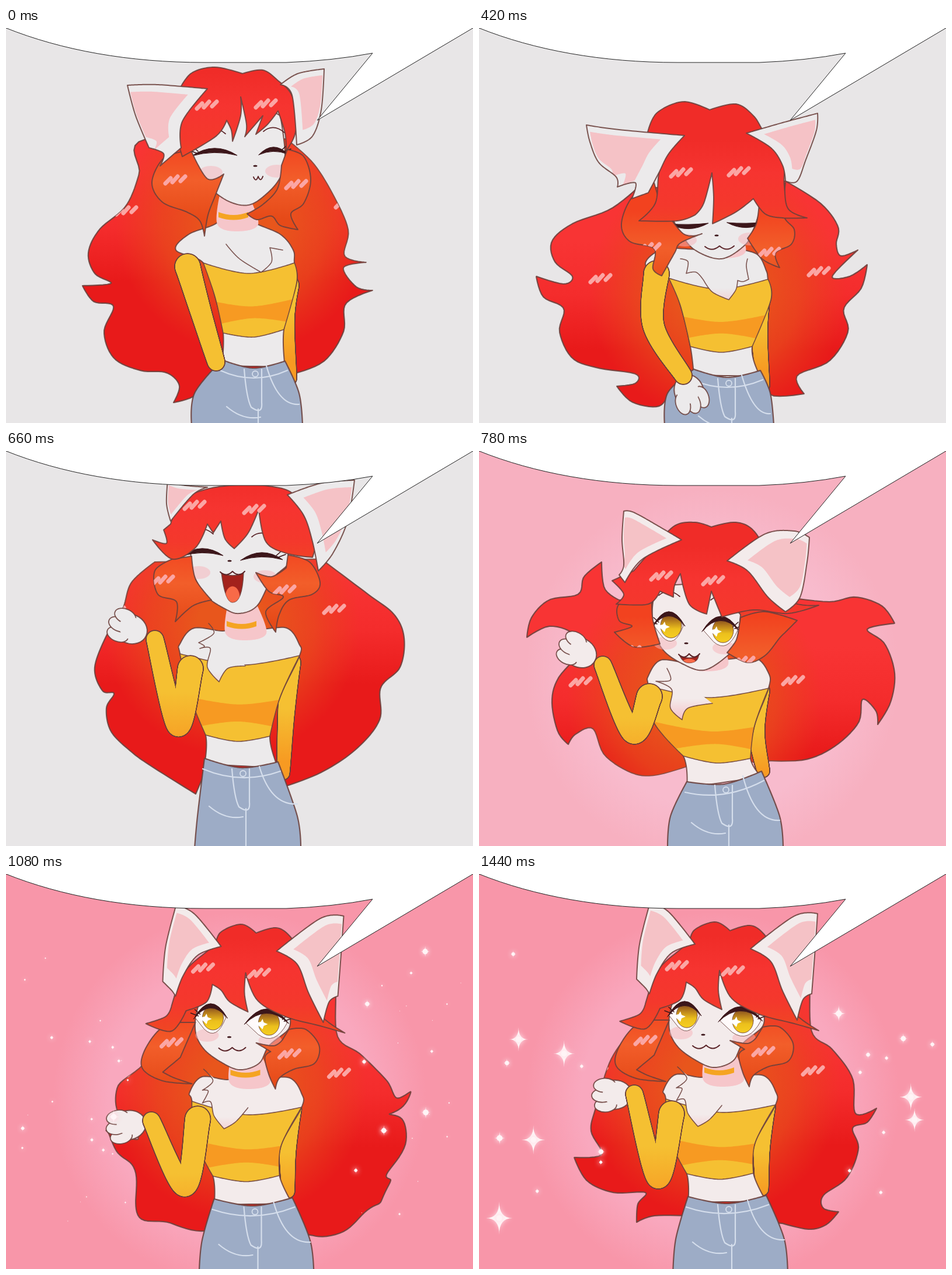
Animation, 800 px wide and 676 px high, one loop 1.5 s. Source, as an HTML page with a canvas:

```html
<!DOCTYPE html>
<html lang="en">
<head>
<meta charset="utf-8">
<title>Dancing cat girl</title>
<style>
html, body { margin: 0; height: 100%; overflow: hidden }
canvas { display: block; width: 100vw; height: 100vh }
</style>
</head>
<body>
<canvas id="stage" width="800" height="676"></canvas>
<script>
const ctx = document.getElementById('stage').getContext('2d');
const LOOP = 1500, STEP = 60, SAMPLES = 240, TAU = Math.PI * 2;
const INK = '#6b403ce0', DARK = '#3c161a', YELLOW = '#f5c032', ORANGE = '#f79a22';
const GREY = { edge: [232, 230, 231], glow: [232, 230, 231], skin: [236, 234, 235] };

// Key poses. Splines run through "x,y" points; "!" marks a sharp corner, "/" a second line.
// body: neck, then left and right shoulder, neckline, bust, hem, waist, hip.
// eyes: x, y, half width.  mouth: x, y, half width, openness.  hand: x, y, size.
const shy = {
  ...GREY, at: 0, shift: [0, 0], open: 0, arch: 1, sparkle: 0,
  body: '390,306 291,380 492,380 338,402 494,402 358,460 498,435 372,522 476,516 370,568 478,570 318,680 508,680',
  eyes: [[357, 217, 36], [458, 215, 22]], mouth: [432, 257, 8, 0], hand: [350, 560, 0],
  armL: '311,408 332,480 360,572', armR: '484,440 480,500 487,600',
  hair: '240,190 228,250 205,305 160,345 141,385 152,420 180,437 131,441! 150,468 184,476 168,520 185,565 230,586 275,590 297,612 287,641! 325,628 350,590! 492,592! 545,570 578,520 582,472 628,449! 600,443 578,410 617,401! 580,390 586,345 560,285 525,230 480,190!',
  tuft: '377,370! 400,395 437,418! 455,400 452,376! 474,380!',
  face: '300,215 318,240 345,270 380,296 415,303 445,285 470,255 478,215 470,150! 400,110! 330,150!',
  lock: '300,212! 268,225 250,265 268,298 310,315 332,330 340,356! 346,320 358,288 373,250! 345,258 318,212!/482,208! 510,220 522,260 510,300 488,318 500,345! 470,338 455,322 430,328 413,318! 440,302 465,275 472,235!',
  bangs: '297,105! 318,77 358,67 405,78! 440,72 466,90 488,112 499,150 494,185 480,210! 478,180 466,142! 448,165 428,182! 440,150! 409,186! 412,165 402,118! 402,150 388,194! 386,175 378,158! 360,185 302,220! 290,165',
  ear: '208,98! 260,97 345,104! 302,160 300,205! 264,236! 270,215 245,205! 222,150/545,70! 500,78 470,97! 490,115 498,200! 525,185 540,140'
};
const bow = {
  ...shy, at: 420, arch: -.6,
  body: '415,352 285,405 492,415 325,428 495,430 345,475 500,465 362,545 468,545 368,584 482,586 318,680 505,680',
  eyes: [[359, 333, 31], [458, 331, 30]], mouth: [412, 376, 25, 0], hand: [362, 628, 1],
  armL: '304,420 299,510 350,595', armR: '482,450 480,520 487,612',
  hair: '270,275! 225,310 160,335 125,365 130,400 160,425 145,438 98,425! 110,460 145,480 138,520 160,565 205,582 268,592 268,608 236,613! 262,640 305,648 325,630 350,600! 495,590! 500,628 557,626! 545,595 600,570 632,520 625,480 655,445 665,405! 635,425 605,425 649,380! 620,390 612,370 615,340 585,300 525,262!',
  tuft: '345,395! 358,400 355,420! 372,418 385,432! 400,452 428,465! 440,448 443,432! 452,434 462,430! 458,408 460,395!',
  face: '330,320 345,350 370,380 415,395 455,372 470,345 482,310! 478,285 400,240! 330,290!',
  lock: '300,265! 262,290 244,335 258,365 300,378 298,412 313,424! 335,385 345,368 382,352! 350,352 310,300!/525,265! 522,320 540,345 535,370 508,385 515,410! 485,395 460,360! 475,335 480,300!',
  bangs: '289,178! 305,145 350,126 395,140! 440,130 470,150 488,178 520,225 523,270 530,310 562,325! 520,325 490,318 470,292! 440,315 400,335! 402,290 399,248! 385,300 370,320! 340,330 274,330! 302,300 308,250 320,210 310,190!',
  ear: '184,166! 240,174 352,184! 325,215 308,248 290,282! 262,292! 268,265 237,272! 235,255 205,230 190,195/580,146! 520,162 458,180! 500,205 520,235 525,262! 545,262 560,225 578,175'
};
const laugh = {
  ...shy, at: 660,
  body: '404,282 298,330 502,330 298,347 503,350 315,420 470,420 342,486 452,488 340,526 466,532 323,680 505,680',
  eyes: [[336, 178, 33], [438, 185, 33]], mouth: [388, 209, 21, 1], hand: [207, 302, 1],
  armL: '316,372 294,470 255,322', armR: '487,362 480,450 475,552',
  hair: '255,190! 215,225 200,270 175,310 152,370 165,410 185,415 172,440 180,480 215,515 250,540 325,587! 345,540! 475,575! 540,550 600,510 640,460 642,405 675,370 682,320 665,280 620,245 540,185!',
  tuft: '347,295! 356,312 330,328! 340,334 332,338! 350,338 345,370 365,395! 380,372 410,368!',
  face: '320,160 318,200 340,245 375,270 400,278 430,265 455,220 485,190 475,160! 430,100! 340,125!',
  lock: '285,185! 255,205 260,245 292,258 290,292! 320,265 352,255! 325,220 318,180!/483,178! 520,190 538,225 525,245 485,255 468,280 462,310! 445,275 475,250 450,240 428,208! 455,215 480,200!',
  bangs: '282,125! 300,85 345,65 400,58 450,60 490,72 510,110 530,150 525,182! 480,175 445,155 433,100! 415,140 391,167! 375,150 368,120! 355,140! 345,125! 325,165 285,185 251,152! 275,158 270,135!',
  ear: '277,50! 300,58 345,62! 320,75 282,120! 275,90/597,50! 540,55 482,75! 510,110 525,155 535,205! 560,175 585,120'
};
const wink = {
  ...shy, at: 780, open: 1, edge: [247, 176, 192], glow: [248, 187, 205], skin: [243, 235, 235],
  body: '385,335 290,385 496,380 290,402 496,406 300,465 472,470 350,522 465,526 356,566 484,548 323,680 521,680',
  eyes: [[325, 299, 25], [414, 307, 29]], mouth: [360, 350, 18, .25], hand: [167, 342, 1],
  armL: '292,420 263,482 212,366', armR: '480,410 475,480 487,548',
  hair: '240,255! 215,235 210,190! 180,215 170,245 120,255 90,285 82,319! 120,300 160,312 170,345 135,390 125,430 135,480 153,502! 165,485 195,475 215,520 260,550 300,555 355,540! 500,530! 560,528 610,505 650,465 657,425 680,445 683,468! 705,430 712,380 695,330 665,305 712,295! 690,265 645,250 600,258 525,250!',
  tuft: '322,372! 328,392 303,394! 330,408 328,440 348,460! 358,440 400,432!',
  face: '300,250 298,300 315,340 350,365 385,375 420,355 440,330 448,280! 400,225! 320,230!',
  lock: '280,245! 240,262 240,290 262,300 232,310! 265,335 310,330! 298,290 296,255!/448,285! 490,275 545,290! 525,310 515,320 490,350 460,362 425,345! 440,325 445,305!',
  bangs: '265,205! 300,165 335,128 370,122 398,130! 440,122 472,138 500,190 530,255 582,264! 530,278 470,272 416,284! 398,240! 390,279! 360,262 345,210! 335,230 333,250! 310,240! 290,262 235,262! 248,245 228,222!',
  ear: '248,103! 265,105 310,130 347,152! 280,185 250,225! 240,212! 248,195 245,150/566,148! 540,137 490,142 425,188! 460,205 495,250 525,275! 550,250 562,190'
};
const smile = {
  ...wink, at: 1200, edge: [248, 150, 169], glow: [249, 168, 190], sparkle: .8,
  body: '412,322 316,370 508,372 320,385 508,395 325,450 473,460 356,513 470,512 358,552 492,550 332,690 529,690',
  eyes: [[352, 242, 26], [448, 251, 35]], mouth: [389, 296, 23, 0], hand: [226, 378, 1],
  armL: '330,410 306,520 266,376', armR: '490,398 484,470 485,540',
  hair: '300,225! 260,270 235,335 200,420 188,470 205,520 186,530! 210,548 255,545 290,552 275,585 268,618! 300,605 360,610! 520,620! 560,632 600,622 625,600! 600,592 600,570 640,525 645,480 635,450 660,440 680,411! 645,420 638,350 605,300 565,265 565,185 545,190!',
  tuft: '340,330! 356,350 338,366! 348,368 338,388! 352,386 358,410 375,432! 395,420 416,396!',
  face: '330,225 326,265 340,295 370,318 402,331 435,320 452,290 485,262 488,240! 430,170! 350,185!',
  lock: '300,250! 265,262 238,300 236,330 270,350 320,355! 290,345 270,335! 300,310! 326,250!/486,262! 515,262 538,290 530,320 495,330 470,345 463,364! 452,340 445,310 455,300! 430,285! 460,290 475,280!',
  bangs: '290,205! 310,160 355,120 370,95 405,82 430,97! 465,88 490,105 515,145 530,190 538,235 582,268! 540,256 480,240 432,212 412,165! 410,200 416,232! 385,215 370,195 355,185! 345,215 310,230! 285,265 241,252! 275,240 285,222!',
  ear: '293,49! 325,65 370,120! 330,135 305,170 292,205! 285,195 270,180! 275,120/580,68! 540,72 465,128! 500,150 520,200 545,250! 555,215 570,205! 575,140'
};
const reach = {
  ...smile, at: 960, shift: [-3, 8], sparkle: .35, hand: [185, 476, 1],
  armL: '330,420 309,540 235,460',
  hair: '298,227! 268,282 233,317 183,307! 198,342 253,382! 188,352 147,328! 143,402 153,442 168,512 188,552 258,572 303,604 363,597! 523,604! 578,587 620,537 673,512 725,454! 698,457 728,402 718,362 678,367! 705,345 710,325! 693,342 663,347 613,310 573,282 565,192 545,192!'
};
const rest = {
  ...smile, at: 1440, sparkle: 1,
  hair: '300,225! 260,270 225,320 200,400 192,440 210,480 163,485! 185,525 230,545 285,545 272,565 270,596! 300,585 360,585! 520,598! 565,608 595,600 616,578! 590,572 590,550 630,520 650,470 640,435 665,425 681,401! 645,410 640,350 605,300 570,270 565,185 545,190!'
};

const points = text => [...text.matchAll(/(\d+),(\d+)(!?)/g)].map(m => [+m[1], +m[2], !!m[3]]);
const mix = (a, b, f) => a + (b - a) * f;
const between = (a, b, f) => [mix(a[0], b[0], f), mix(a[1], b[1], f)];
const sharp = p => [p[0], p[1], true];

function spline(pts, closed = true) {
  const len = pts.length, spans = closed ? len : len - 1;
  const at = k => closed ? pts[(k + len) % len] : pts[Math.max(0, Math.min(k, len - 1))];
  return Array.from({ length: SAMPLES + 1 }, (_, i) => {
    const u = i * spans / SAMPLES, k = Math.min(Math.floor(u), spans - 1), t = u - k, s = 1 - t;
    const [a, b, c, d] = [k - 1, k, k + 1, k + 2].map(at);
    return [0, 1].map(n => {
      const out = b[n] + (b[2] ? 0 : (c[n] - a[n]) / 6);
      const into = c[n] - (c[2] ? 0 : (d[n] - b[n]) / 6);
      return s * s * s * b[n] + 3 * s * s * t * out + 3 * s * t * t * into + t * t * t * c[n];
    });
  });
}
const OPEN = ['armL', 'armR', 'tuft'];
const poses = [shy, bow, laugh, wink, reach, smile, rest].map(pose =>
  Object.fromEntries(Object.entries(pose).map(([part, v]) => [part,
    typeof v !== 'string' ? v :
    part === 'body' ? points(v).map(p => p.slice(0, 2)) :
    v.split('/').map(line => spline(points(line), !OPEN.includes(part)))])));

const blend = (a, b, f) => Array.isArray(a) ? a.map((v, i) => blend(v, b[i], f)) : mix(a, b, f);
const rgb = c => `rgb(${c.map(Math.round)})`;
function trace(lines) {
  const path = new Path2D();
  for (const line of lines) line.forEach(([x, y], i) => i ? path.lineTo(x, y) : path.moveTo(x, y));
  return path;
}
const smooth = (...pts) => trace([spline(pts)]);
function paint(path, fill, width, line = INK) {
  if (fill) { ctx.fillStyle = fill; ctx.fill(path) }
  if (width) { ctx.strokeStyle = line; ctx.lineWidth = width; ctx.stroke(path) }
}
function clipped(path, action) {
  ctx.save();
  ctx.clip(path);
  action();
  ctx.restore();
}
function ramp(gradient, ...colors) {
  colors.forEach((c, i) => gradient.addColorStop(i / (colors.length - 1), c));
  return gradient;
}
const vertical = (y0, y1, ...colors) => ramp(ctx.createLinearGradient(0, y0, 0, y1), ...colors);
const radial = (x, y, r0, r1, ...colors) => ramp(ctx.createRadialGradient(x, y, r0, x, y, r1), ...colors);
function ellipse(x, y, rx, ry = rx) {
  const path = new Path2D();
  path.ellipse(x, y, rx, ry, 0, 0, TAU);
  return path;
}

function limb(line, r0, r1, fill) {
  for (const [grow, color] of [[1.8, '#6b403c'], [0, fill]])
    line.forEach(([x, y], i) => paint(ellipse(x, y, mix(r0, r1, i / SAMPLES) + grow), color));
}
function drawHand([x, y, size], wrist, skin) {
  if (size < .05) return;
  const turn = Math.atan2(y - wrist[1], x - wrist[0]);
  ctx.save();
  ctx.translate(x, y);
  ctx.rotate(turn);
  ctx.scale(size, size);
  paint(ellipse(-6, 0, 30, 25), skin, 2);
  for (const k of [-1, 0, 1]) paint(ellipse(14 - 4 * Math.abs(k), k * 17, 19, 12), skin, 1.8);
  paint(ellipse(-10, 2, 24, 19), skin);
  ctx.restore();
}

function drawBody(p, skin) {
  const [neck, shL, shR, neckL, neckR, bustL, bustR, hemL, hemR, waistL, waistR, hipL, hipR] = p.body;
  const [nx, ny] = neck;
  const middle = (a, b, sag) => [(a[0] + b[0]) / 2, (a[1] + b[1]) / 2 + sag];
  const low = ([x, y], dy) => [x, y + dy];
  const slope = (x, sh) => [mix(x, sh[0], .7), sh[1] - 27];

  limb(p.armR[0], 17, 10, vertical(neckR[1], waistR[1], YELLOW, YELLOW, ORANGE));
  paint(smooth([nx - 24, ny - 20, true], [nx - 25, ny + 24], slope(nx - 25, shL), shL, neckL, bustL, hemL,
    sharp(low(waistL, 10)), sharp(low(waistR, 10)), hemR, bustR, neckR, shR, slope(nx + 28, shR),
    [nx + 26, ny + 20], [nx + 26, ny - 20, true]), skin, 2);
  paint(smooth([nx - 24, ny - 20, true], [nx - 28, ny + 30], [nx + 5, ny + 42], [nx + 42, ny + 30],
    [nx + 25, ny - 20, true]), '#f6c6ca');
  paint(new Path2D(`M${nx - 26} ${ny + 9}q26 10 51 0v9q-25 9-51 0z`), '#f5a422');

  const top = smooth(sharp(neckL), middle(neckL, neckR, 18), sharp(neckR), bustR, sharp(hemR),
    middle(hemL, hemR, 10), sharp(hemL), bustL);
  paint(top, YELLOW);
  const band = (f, sag) => {
    const l = between(neckL, hemL, f), r = between(neckR, hemR, f), wide = 25;
    return [[l[0] - wide, l[1], true], middle(l, r, sag), [r[0] + wide, r[1], true]];
  };
  clipped(top, () => paint(smooth(...band(.5, 16), ...band(.92, -13).reverse()), ORANGE));
  paint(top, null, 1.6);

  const belt = middle(waistL, waistR, 13);
  paint(smooth(sharp(waistL), belt, sharp(waistR), [hipR[0] - 6, 625], sharp(hipR), sharp(hipL),
    [hipL[0] + 5, 625]), '#9dacc6', 2.2);
  const [bx, by] = belt;
  paint(new Path2D(`M${waistL[0] - 3} ${waistL[1] + 18}Q${bx} ${by + 30} ${waistR[0] + 4} ${waistR[1] + 16}
    M${bx - 16} ${by + 2}q4 50 12 65q20 14 18-8V${by + 2}M${bx + 8} ${by + 70}V680
    M${waistR[0] - 32} ${waistR[1] + 8}Q${waistR[0] - 12} ${by + 65} ${hipR[0] - 6} ${by + 62}
    M${waistL[0] + 8} ${by + 66}q28 24 58 18`), null, 2.2, '#d5deec');
  paint(ellipse(bx + 3, by + 10, 5), null, 1.8, '#d5deec');

  const wrist = p.armL[0][SAMPLES];
  drawHand(p.hand, wrist, skin);
  limb(p.armL[0], 21, 14, vertical(wrist[1] - 10, wrist[1] + 190, YELLOW, YELLOW, ORANGE));
  paint(trace(p.tuft), vertical(shL[1], hemL[1] - 60, skin, skin, '#f6bfc5'), 1.6);
}

function drawEye([x, y, w], side, p, skin) {
  const { open, arch } = p, lift = mix(arch * 9, 22, open), drop = 20 * open;
  paint(ellipse(x + side * 6, y + 30, 20, 11), '#f8b4ba80');
  const white = new Path2D(`M${x - w} ${y}Q${x} ${y - 2 * lift} ${x + w} ${y}Q${x + w * .4} ${y + 2 * drop} ${x - w * .4} ${y + drop}z`);
  if (open > .1) {
    paint(white, '#fffafa', 1);
    clipped(white, () => {
      paint(ellipse(x + 4, y, 18, 21), vertical(y - 21, y + 19, '#7a4020', '#b8801c', '#ecc01c', '#f4cc20'), 1);
      paint(new Path2D(`M${x - 20} ${y}l10-2 3-5 2 6 7 3-7 3-2 6-4-4z`), '#fff');
    });
  }
  paint(new Path2D(`M${x - w - 3} ${y + 2}Q${x} ${y - 2 * lift - 6} ${x + w + 3} ${y + 1}Q${x} ${y - 2 * lift + 9} ${x - w - 3} ${y + 2}z`), DARK, 1, DARK);
  const outer = x + side * w, brow = y - mix(42, 56, open);
  paint(new Path2D(`M${outer - side * 5} ${y - 3}l${side * 13}-5M${outer - side * 8} ${y - 6}l${side * 9}-8`), null, 1.6, DARK);
  paint(new Path2D(`M${x - 17} ${brow + 4}q17-14 36 2`), null, 1.7, '#5a2428');
}
function drawMouth([x, y, w, open]) {
  if (open > .02) {
    const depth = 50 * open, lips = new Path2D(`M${x - w * .9} ${y}Q${x} ${y + 8} ${x + w * .9} ${y}Q${x + w * .8} ${y + depth} ${x} ${y + depth}Q${x - w * .6} ${y + depth} ${x - w * .9} ${y}z`);
    paint(lips, '#a3221c', 1.5);
    clipped(lips, () => paint(ellipse(x, y + depth * .85, w * .6, depth * .4), '#f86a48'));
  }
  paint(new Path2D(`M${x - w} ${y - 2}Q${x - w * .5} ${y + 8} ${x} ${y - 3}Q${x + w * .5} ${y + 8} ${x + w} ${y - 3}`), null, 2, '#5a2428');
  paint(ellipse(x - 5, y - 21, 3.5, 1.6), DARK);
}
function shine(x, y) {
  paint(new Path2D(`M${x - 18} ${y + 7}l9-9M${x - 6} ${y + 5}l9-10M${x + 8} ${y + 3}l8-8`), null, 7, '#fba6a4');
}

function drawFigure(p) {
  const skin = rgb(p.skin), [left, right] = p.eyes, [ex, ey] = between(left, right, .5);
  const back = trace(p.hair);
  ctx.lineJoin = ctx.lineCap = 'round';
  ctx.save();
  ctx.translate(...p.shift);
  paint(back, vertical(ey - 60, ey + 310, '#f83434', '#f83434', '#f42c2c', '#e81a1a', '#e81a1a'), 2.2);
  paint(back, radial(ex, ey + 120, 60, 220, '#e8561c', '#e84a1cbb', '#e8401c00'));
  clipped(back, () => {
    shine(left[0] - 150, left[1] + 95);
    shine(right[0] + 125, right[1] + 85);
  });
  drawBody(p, skin);
  paint(trace(p.face), skin, 2);
  drawEye(left, -1, p, skin);
  drawEye(right, 1, p, skin);
  drawMouth(p.mouth);
  paint(trace(p.lock), vertical(ey - 20, ey + 110, '#f2421f', '#f25e2a', '#e64a18'), 2);
  paint(trace(p.bangs), vertical(ey - 140, ey + 30, '#f02c28', '#f63430', '#f4382c', '#ee4a20'), 2);
  for (const ear of p.ear) {
    const path = trace([ear]), tip = ear[0];
    const base = ear.reduce((sum, q) => [sum[0] + q[0] / ear.length, sum[1] + q[1] / ear.length], [0, 0]);
    paint(path, skin);
    const inner = ear.map(q => between([mix(tip[0], base[0], .3), mix(tip[1], base[1], .3) + 22], q, .72));
    clipped(path, () => paint(trace([inner]), '#f5c2c6'));
    paint(path, null, 2);
  }
  for (const [x, y] of p.eyes) shine(x - 12, y - 86);
  clipped(trace(p.lock), () => {
    shine(left[0] - 66, left[1] + 42);
    shine(right[0] + 40, right[1] + 52);
  });
  ctx.restore();
}

// Seeded sparkles on both sides; each key pose scatters its own set.
function drawSparkles(seed, amount) {
  if (amount < .02) return;
  const random = n => { const v = Math.sin(seed * 91.7 + n * 37.3) * 43758.5; return v - Math.floor(v) };
  ctx.save();
  ctx.fillStyle = ctx.strokeStyle = '#fff4f6';
  ctx.shadowColor = '#ffd5df';
  ctx.shadowBlur = 8;
  ctx.lineWidth = 3;
  for (let n = 0; n < 22; n++) {
    const x = (n % 2 ? 590 : 20) + random(n) * 190, y = 130 + random(n + 50) * 480;
    const r = (5 + 28 * random(n + 100) ** 4) * amount;
    ctx.beginPath();
    ctx.moveTo(x, y - r);
    for (const [dx, dy] of [[.8, 0], [0, 1], [-.8, 0], [0, -1]]) ctx.quadraticCurveTo(x, y, x + r * dx, y + r * dy);
    ctx.fill();
    ctx.fill(ellipse(x, y, Math.min(r * .5, 5)));
  }
  ctx.restore();
}

function draw(time) {
  const i = poses.findLastIndex(p => p.at <= time), a = poses[i], b = poses[i + 1] || a;
  const f = a === b ? 0 : (time - a.at) / (b.at - a.at);
  const p = Object.fromEntries(Object.keys(a).map(part => [part, blend(a[part], b[part], f)]));

  ctx.fillStyle = radial(400, 385, 225, 320, rgb(p.glow), rgb(p.edge));
  ctx.fillRect(0, 0, 800, 676);
  drawFigure(p);
  drawSparkles(i, a.sparkle * (1 - f));
  drawSparkles(i + 1, b.sparkle * f);
  paint(new Path2D('M0 0C95 38 210 59 340 59H480Q560 56 628 43L533 158L800 0'), '#fff', 1, '#222');
}

function tick(now) {
  draw(Math.floor(now % LOOP / STEP) * STEP);
  requestAnimationFrame(tick);
}
requestAnimationFrame(tick);
</script>
</body>
</html>
```
